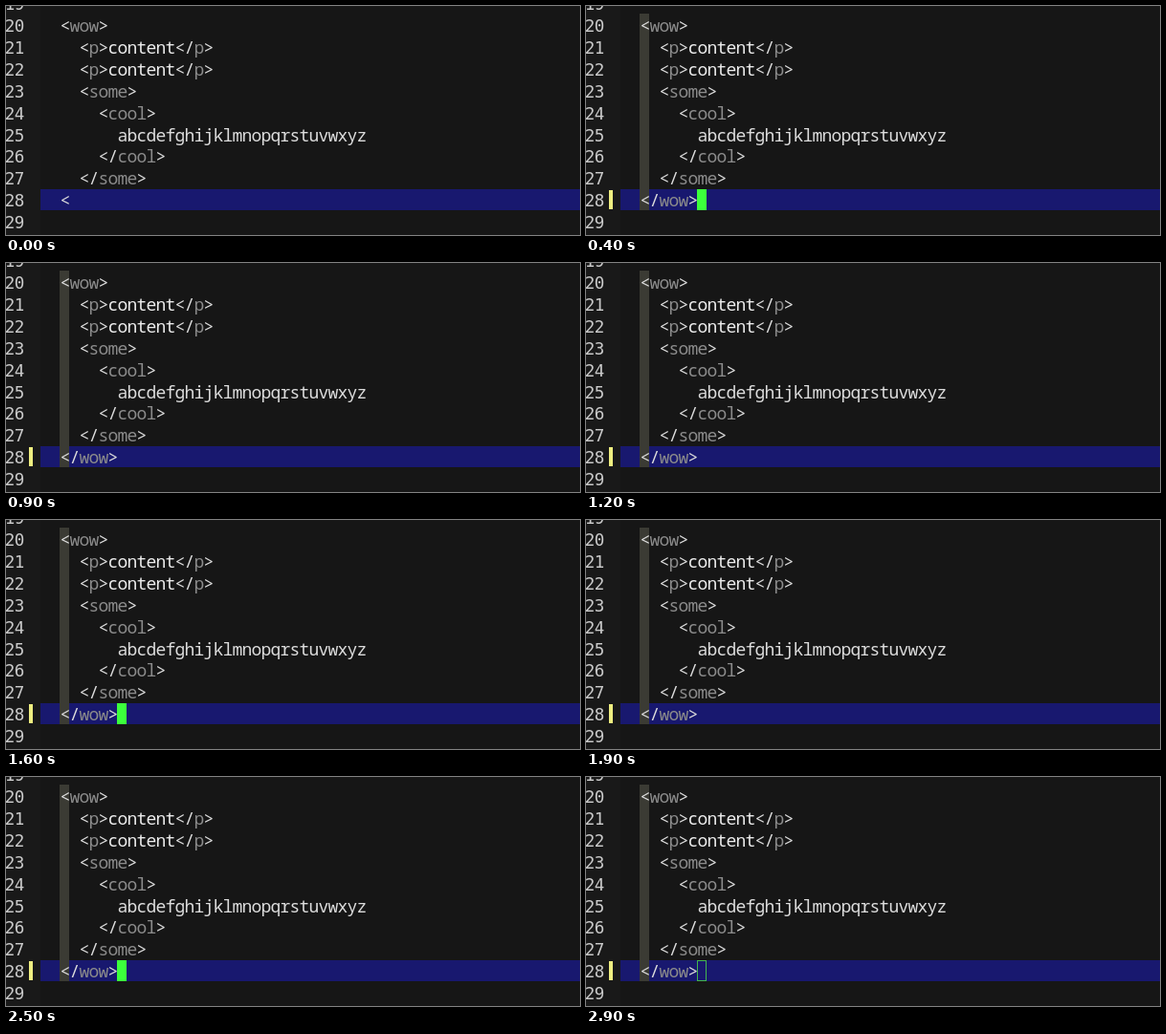
An HTML page for the animation above (3000 ms loop, 600 by 240 pixels).

```html
<!DOCTYPE html>
<html lang="en">
<head>
<meta charset="utf-8">
<title>Closing tag completion</title>
<style>
  html, body { margin: 0; width: 100%; height: 100%; overflow: hidden; background: #161616; }
  svg { display: block; width: 600px; height: 240px; }
  text { font: 18px "Noto Sans Mono", "DejaVu Sans Mono", monospace; letter-spacing: -.8px; white-space: pre; fill: #dcdcdc; }
  .num { font: 17.5px "DejaVu Sans Mono", monospace; letter-spacing: -.53px; fill: #cacaca; }
  .tag { fill: #8b8b8b; }
  .word { font-weight: 500; fill: #ececec; }

  .done, .cursor, .hollow { animation: 3s step-end infinite; }
  .done { animation-name: done; }
  .cursor { animation-name: blink; }
  .hollow { animation-name: blur; }

  /* the typed "/" completes the whole tag */
  @keyframes done {
    0% { visibility: hidden; }
    6.667%, 100% { visibility: visible; }
  }
  /* half-second blink after typing */
  @keyframes blink {
    0% { visibility: hidden; transform: translateX(-50px); }
    3.333% { visibility: visible; transform: translateX(-50px); }
    6.667% { visibility: visible; transform: none; }
    30% { visibility: hidden; transform: none; }
    46.667% { visibility: visible; transform: none; }
    63.333% { visibility: hidden; transform: none; }
    80% { visibility: visible; transform: none; }
    96.667%, 100% { visibility: hidden; transform: none; }
  }
  @keyframes blur {
    0% { visibility: hidden; }
    96.667%, 100% { visibility: visible; }
  }
</style>
</head>
<body>
<svg viewBox="0 0 600 240">
  <rect width="600" height="240" fill="#161616"/>
  <rect width="36" height="240" fill="#191919"/>
  <rect x="36" y="192" width="564" height="22" fill="#18186f"/>
  <g class="done">
    <rect x="56" y="8" width="10" height="206" fill="#3b3b34"/>
    <rect x="24" y="193" width="4" height="20" fill="#eeee80"/>
  </g>
  <rect class="cursor" x="116" y="192" width="10" height="22" fill="#3cff3c"/>
  <rect class="hollow" x="116.5" y="192.5" width="9" height="21" fill="none" stroke="#43b64f"/>
  <g id="code"></g>
</svg>
<script>
  const code = document.getElementById("code");
  const CELL = 10, LEFT = 56.4, FIRST = 20;
  const baseline = n => 27 + 22.9 * (n - FIRST);

  function add(parent, name, attrs, text = "") {
    const el = document.createElementNS("http://www.w3.org/2000/svg", name);
    for (const key in attrs) el.setAttribute(key, attrs[key]);
    el.textContent = text;
    return parent.appendChild(el);
  }

  // Brackets stay light, tag names go grey.
  function addLine(n, col, source, cls = "") {
    const line = add(code, "text", { x: LEFT + col * CELL, y: baseline(n), class: cls });
    let inTag = false;
    for (const part of source.match(/<\/?|>|\/|[a-z]+/g)) {
      const word = /[a-z]/.test(part);
      const style = !word ? "" : inTag ? "tag" : part === "content" ? "word" : "";
      add(line, "tspan", { class: style }, part);
      if (!word) inTag = part !== ">";
    }
  }

  for (let n = 19; n <= 29; n++)
    add(code, "text", { x: -1.2, y: baseline(n), class: "num" }, n);

  [
    [0, "<wow>"],
    [2, "<p>content</p>"],
    [2, "<p>content</p>"],
    [2, "<some>"],
    [4, "<cool>"],
    [6, "abcdefghijklmnopqrstuvwxyz"],
    [4, "</cool>"],
    [2, "</some>"],
    [0, "<"]
  ].forEach(([col, source], i) => addLine(FIRST + i, col, source));

  addLine(28, 1, "/wow>", "done");
</script>
</body>
</html>
```
